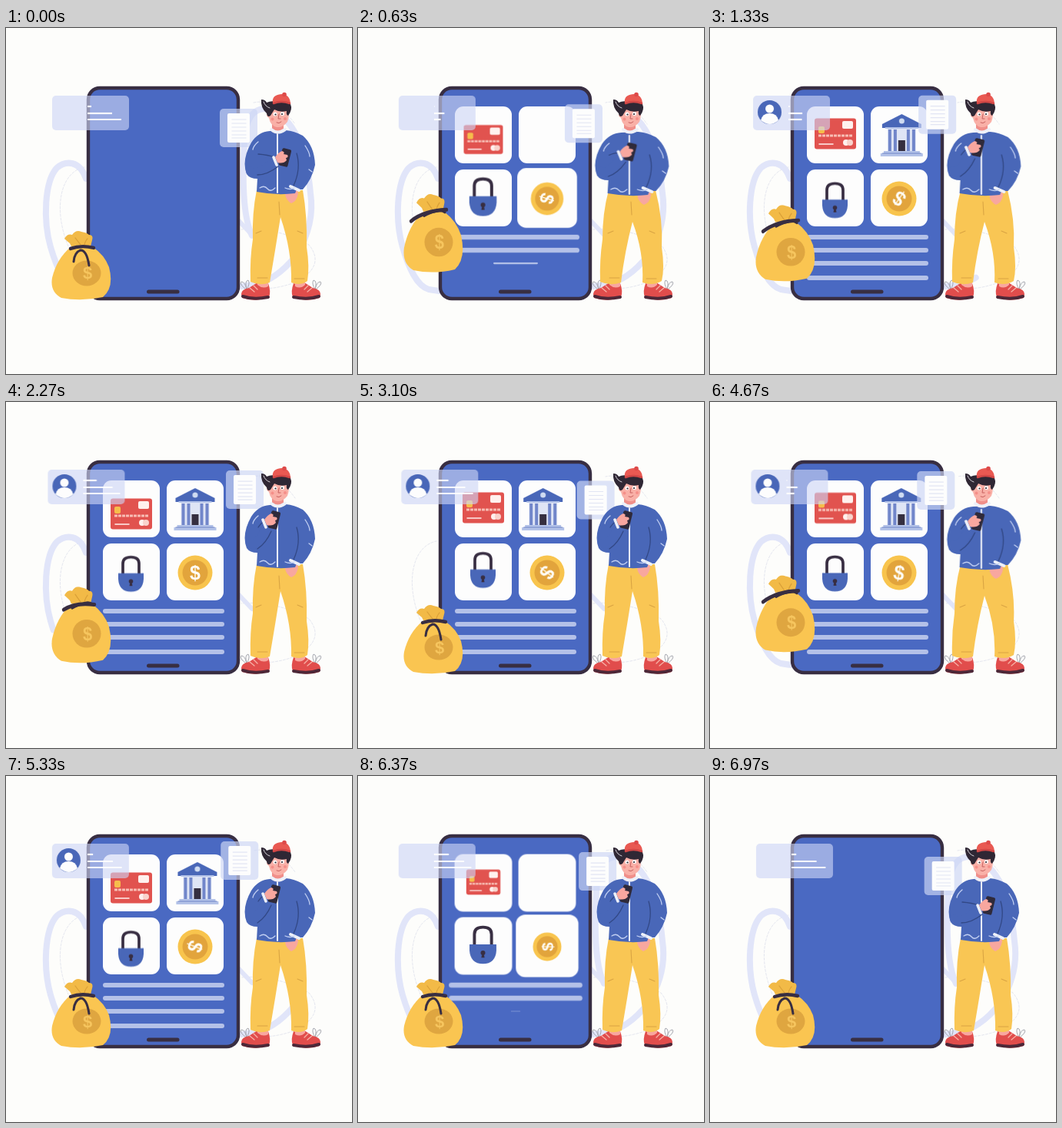
An HTML page without scripts for the animation above (7.01 s loop, 450 by 450 pixels).

```html
<!DOCTYPE html>
<html lang="en">
<head>
<meta charset="utf-8">
<title>Mobile banking</title>
<style>
:root {
  --loop: 7.01s; --half: 3.505s; --quarter: 1.7525s;
  --blue: #4967b8; --dark: #382e42; --yellow: #f9c654; --skin: #f8a79f; --paper: #fdfdfd;
}
html, body { margin: 0; width: 100%; height: 100%; overflow: hidden; background: #fdfdfb; }
svg { display: block; width: 100vw; height: 100vh; }
text { font-family: "Liberation Sans", Arial, sans-serif; font-weight: 700; text-anchor: middle; }
.line { fill: none; stroke-linecap: round; stroke-linejoin: round; }

/* staggered pops */
.pop { transform-box: fill-box; transform-origin: center; animation: tile var(--loop) linear infinite; }
.wide { animation-name: wide; }
.icon { animation-name: icon; }
.early { animation-name: early; }
.lock { animation-name: lock; }
.third { animation-name: third; }
@keyframes tile { 0%, 2% { transform: scale(0) } 5% { transform: scale(1.1) } 7%, 90.5% { transform: scale(1) } 94% { transform: scale(1.1) } 97.5%, 100% { transform: scale(0) } }
@keyframes wide { 0%, 4.5% { transform: scale(0) } 8% { transform: scale(1.1) } 10%, 88.5% { transform: scale(1) } 90.9% { transform: scale(1.1) } 94%, 100% { transform: scale(0) } }
@keyframes icon { 0%, 6% { transform: scale(0) } 9.5% { transform: scale(1.1) } 12%, 88% { transform: scale(1) } 90% { transform: scale(1.1) } 93.5%, 100% { transform: scale(0) } }
@keyframes early { 0%, 9% { transform: scale(0) } 12% { transform: scale(1.1) } 14%, 86.5% { transform: scale(1) } 88% { transform: scale(1.1) } 90.5%, 100% { transform: scale(0) } }
@keyframes lock { 0%, 5% { transform: scale(0) } 8.5% { transform: scale(1.1) } 10.5%, 90% { transform: scale(1) } 91.5% { transform: scale(1.1) } 94.5%, 100% { transform: scale(0) } }
@keyframes third { 0%, 8% { transform: scale(0) } 11% { transform: scale(1.1) } 13%, 86.5% { transform: scale(1) } 88% { transform: scale(1.1) } 91.1%, 100% { transform: scale(0) } }

/* floating parts */
.slide { animation: slide calc(var(--quarter) / 2) ease-in-out infinite alternate; }
@keyframes slide { to { transform: translateX(-8.5px) } }
.hover { animation: hover var(--quarter) ease-in-out infinite alternate; }
@keyframes hover { from { transform: translateY(-6.5px) } to { transform: translateY(.5px) } }
.lift { animation: lift var(--quarter) ease-in-out infinite; }
@keyframes lift { 0%, 30%, 100% { transform: none } 63% { transform: translateY(-7.5px) } 76% { transform: translateY(-8px) } }
.sway { animation: sway var(--quarter) calc(var(--half) * -.07) ease-in-out infinite alternate; }
@keyframes sway { from { transform: translateX(-4px) } to { transform: translateX(5px) } }
.turn { transform-origin: 246px 222px; animation: turn var(--loop) linear infinite; }
@keyframes turn { from { transform: rotate(10deg) } to { transform: rotate(1090deg) } }

/* text strokes on the profile card grow and shrink */
.row { stroke-dasharray: var(--mid) 200; animation: row var(--half) infinite; }
@keyframes row {
  0%, 50% { stroke-dasharray: var(--mid) 200; animation-timing-function: ease-out }
  25% { stroke-dasharray: var(--min) 200; animation-timing-function: ease-in }
  75% { stroke-dasharray: var(--max) 200; animation-timing-function: ease-in }
  100% { stroke-dasharray: var(--mid) 200 }
}

/* ribbon and dashes */
.trail { stroke-dasharray: 100 200; animation: trail var(--loop) linear infinite; }
@keyframes trail { 0%, 90.9%, 100% { stroke-dashoffset: 0 } 40%, 56.6% { stroke-dashoffset: 101 } }
.march { stroke-dasharray: 3 2; animation: march var(--half) linear infinite; }
@keyframes march { to { stroke-dashoffset: -50 } }

/* money bag */
.bag { transform-origin: 98px 353px; animation: bounce var(--half) linear infinite; }
@keyframes bounce {
  0%, 50%, 53%, 77%, 100% { transform: none }
  13.3% { transform: translateY(-33px) scaleY(1.14) }
  22% { transform: translateY(-38px) scaleY(1.14) }
  38% { transform: translateY(-24px) scaleY(1.11) }
  64.8% { transform: translateY(-14px) scaleY(1.11) }
}
.band { animation: band var(--half) linear infinite; }
@keyframes band {
  0%, 50%, 54%, 76%, 100% { d: path("M84 287Q98 282 114 286") }
  10%, 40% { d: path("M69 295Q86 283 115 282") }
  64.8% { d: path("M75 291Q90 282 115 285") }
}
.tail { animation: tail var(--half) linear infinite; }
@keyframes tail {
  0%, 50%, 54%, 76%, 100% { d: path("M88 304Q89 292 97 289Q105 289 108 309") }
  10%, 40%, 64.8% { d: path("M86 289Q94 285 100 284Q108 281 113 285") }
}

/* man */
.jacket { transform-origin: 356px 214px; animation: breathe var(--half) ease-in-out infinite; }
@keyframes breathe { 0%, 52%, 100% { transform: none } 13.3%, 38% { transform: translateY(2px) scaleX(1.05) } }
.pants { animation: pants var(--half) ease-in-out infinite; }
@keyframes pants {
  0%, 52%, 100% { d: path("M326 211H386Q392 245 391 285Q395 310 392 329Q383 336 371 331Q372 290 357 246Q350 290 343 331Q330 336 318 330Q317 300 321 275Q320 240 326 211Z") }
  13.3%, 38% { d: path("M326 211H387Q397 250 395 285Q399 312 395 329Q384 336 370 331Q372 292 357 252Q347 290 342 331Q328 336 315 330Q314 302 318 275Q318 240 326 211Z") }
}
.hand { animation: hand var(--loop) ease-in-out infinite; }
@keyframes hand { 0%, 5%, 98.5%, 100% { transform: none } 12%, 92% { transform: translate(-14px, -15px) } }
.arm { animation: arm var(--loop) ease-in-out infinite; }
@keyframes arm {
  0%, 5%, 98.5%, 100% { d: path("M318 186Q324 194 351 173") }
  12%, 92% { d: path("M318 184Q326 190 339 162") }
}
.crease { animation: crease var(--loop) ease-in-out infinite; }
@keyframes crease {
  0%, 5%, 98.5%, 100% { d: path("M328 164Q341 165 349 168M327 191Q340 191 354 180") }
  12%, 92% { d: path("M328 163Q332 157 335 156M327 191Q338 184 345 168") }
}
</style>
</head>
<body>
<svg viewBox="0 0 450 450" role="img" aria-label="Man with a banking app and a money bag">
  <defs>
    <rect id="tile" width="74" height="74" rx="11" fill="#fdfdfd"/>
    <g id="shoe">
      <path d="M306 346Q306 340 316 338L327 331Q334 335 341 332Q345 343 342 350Q324 357 307 351Z" fill="#e14d4c"/>
      <path class="line" d="M308 349Q322 354 341 350" stroke="#4d2838" stroke-width="4"/>
      <path class="line" d="M317 338L323 343M322 335L327 340" stroke="#f6b1a6" stroke-width="1.3"/>
    </g>
    <path id="sprig" class="line" d="M312 340Q303 333 306 330Q311 330 313 340Q310 329 315 328Q318 332 313 340" stroke="#a3a5ad" stroke-width="1"/>
  </defs>

  <!-- ribbons -->
  <path class="line march" stroke="#e4e6ef" stroke-width="1" d="M102 181C72 187 60 232 81 284M306 262Q350 258 394 282Q416 309 378 330Q340 345 304 335M322 97Q352 91 376 125"/>
  <g class="line" stroke="#e1e5f9">
    <path d="M302 250L320 269" stroke-width="6"/>
    <path class="trail" pathLength="100" stroke-width="8" d="M104 196C96 172 78 172 66 182C50 200 48 250 58 285C66 312 76 335 92 340C150 350 250 345 320 334Q350 330 378 295Q402 255 396 215Q388 125 345 106Q312 98 310 150Q305 240 320 270"/>
  </g>

  <!-- phone -->
  <rect x="107" y="78" width="195" height="274" rx="15" fill="#4a69c2" stroke="var(--dark)" stroke-width="4.4"/>
  <path class="line" d="M185.500 343H223" stroke="var(--dark)" stroke-width="5"/>

  <g class="pop"><use href="#tile" x="126" y="102"/></g>
  <g class="pop"><use href="#tile" x="209" y="102"/></g>
  <g class="pop"><use href="#tile" x="126" y="184"/></g>
  <g class="pop wide"><use href="#tile" x="209" y="184"/></g>

  <g class="line" stroke="#b4c1e8" stroke-width="6">
    <path class="pop wide" d="M129 272H281"/>
    <path class="pop wide" d="M129 289H281"/>
    <path class="pop third" d="M129 306H281"/>
    <path class="pop early" d="M129 325H281"/>
  </g>

  <g class="pop icon"><g class="lift">
    <rect x="136" y="125.500" width="54" height="40" rx="3" fill="#e1534f"/>
    <rect x="141" y="136" width="8" height="9" rx="2" fill="#f6bd4b"/>
    <rect x="172" y="129" width="14" height="10" rx="2" fill="#fff1ee"/>
    <path d="M141 148H186" stroke="#f8bdb4" stroke-width="3" stroke-dasharray="4 1"/>
    <path class="line" d="M142 159H160" stroke="#fff1ee" stroke-width="1.500"/>
    <circle cx="177" cy="157" r="4" fill="#fff1ee"/><circle cx="182" cy="157" r="4" fill="#f9d3cc"/>
  </g></g>

  <g class="pop early"><g class="sway">
    <path d="M226 131H263V160H226Z" fill="#dfe5f5"/>
    <path d="M229 132V160M236 132V160M253 132V160M260 132V160" stroke="#7186ca" stroke-width="4"/>
    <path d="M219 125L244.500 112L270 125V130H219Z" fill="var(--blue)"/>
    <circle cx="244.500" cy="121" r="3.500" fill="#cfdcf2"/>
    <path d="M223 130H266" stroke="#b3c2e8" stroke-width="2"/>
    <path d="M240 146H249V160H240Z" fill="#352f40"/>
    <path d="M221 160H268V163H272V167H217V163H221Z" fill="#b3c2e8"/>
    <path d="M219 163H270" stroke="#6e84c7" stroke-width="1"/>
  </g></g>

  <g class="pop lock"><g class="hover">
    <path class="line" d="M152 224V211Q152 202.500 162.500 202.500T173 211V224" stroke="var(--dark)" stroke-width="3.700"/>
    <path d="M146 223.500H179V231Q178 247.500 162.500 247.500T146 231Z" fill="var(--blue)"/>
    <circle cx="162.500" cy="234" r="2.800" fill="var(--dark)"/><path d="M161.500 235H163.500L164.500 240H160.500Z" fill="var(--dark)"/>
  </g></g>

  <g class="pop icon">
    <circle cx="246" cy="222" r="22.500" fill="#f8c44d"/>
    <circle cx="246" cy="222" r="16.500" fill="#e2a43c"/>
    <text class="turn" x="246" y="231" font-size="25" fill="#fffdf7">$</text>
  </g>

  <!-- profile card -->
  <g class="slide">
    <rect x="60" y="88" width="100" height="45" rx="5" fill="#cdd6f5" opacity=".62"/>
    <g class="pop early">
      <circle cx="81.500" cy="109.500" r="15.500" fill="var(--blue)"/>
      <circle cx="81.500" cy="105" r="5.500" fill="var(--paper)"/>
      <path d="M70 120Q72 111 81.500 111T93 120Q82 130 70 120Z" fill="var(--paper)"/>
    </g>
    <g fill="none" stroke="var(--paper)" stroke-width="2.200">
      <path class="row" style="--min:0; --mid:5; --max:21" d="M106 102H156"/>
      <path class="row" style="--min:11; --mid:32; --max:40" d="M106 111H156"/>
      <path class="row" style="--min:4; --mid:44; --max:49" d="M106 119H156"/>
    </g>
  </g>

  <!-- floating document -->
  <g transform="translate(302.500 120)"><g>
    <rect x="-24.500" y="-25" width="49" height="50" rx="5" fill="#cdd6f5" opacity=".68"/>
    <rect x="-14.500" y="-19" width="29" height="38" rx="2" fill="var(--paper)"/>
    <path d="M-9 -11H10M-9 -6H10M-9 -1H10M-9 4H10M-9 9H10M-9 13H10" stroke="#e2e5f4" stroke-width="1.200"/>
    <animateMotion dur="3.505s" repeatCount="indefinite" path="M0 10A10 10 0 0 1 0 -10A10 10 0 0 1 0 10"/>
  </g></g>

  <!-- money bag -->
  <g class="bag">
    <path d="M83 280Q76 274 76 274Q80 267 86 269Q91 262 98 265Q105 266 108 269Q114 269 112 276L110 284H85Z" fill="#f2ba47"/>
    <path class="line" d="M90 273Q96 281 98 283M106 274Q102 279 102 283" stroke="#d99f38" stroke-width="1.200"/>
    <path d="M84 285Q98 280 113 285Q128 295 134 311Q141 338 126 350Q98 356 72 351Q57 343 60 325Q66 300 84 285Z" fill="#fac551"/>
    <ellipse cx="105" cy="319" rx="18.500" ry="16.500" fill="#dfa640"/>
    <text x="106" y="326.500" font-size="22" font-weight="400" fill="#f6c55e">$</text>
    <g class="line" stroke="var(--dark)">
      <path class="band" d="M84 287Q98 282 114 286" stroke-width="4.400"/>
      <path class="tail" d="M88 304Q89 292 97 289Q105 289 108 309" stroke-width="3"/>
    </g>
  </g>

  <!-- man -->
  <use href="#sprig"/>
  <use href="#sprig" transform="matrix(-1 0 0 1 715 0)"/>
  <use href="#shoe"/>
  <use href="#shoe" transform="matrix(-1 0 0 1 715 0)"/>
  <path d="M327 325H341V336Q334 340 327 334ZM376 325H389V334Q383 340 376 336Z" fill="var(--skin)"/>
  <path class="pants" d="M326 211H386Q392 245 391 285Q395 310 392 329Q383 336 371 331Q372 290 357 246Q350 290 343 331Q330 336 318 330Q317 300 321 275Q320 240 326 211Z" fill="var(--yellow)"/>
  <path class="line" d="M325 267L332 264M379 264L386 267M355 226L356 243M327 325H340M375 326H388" stroke="#d9a443" stroke-width="1.100"/>
  <g class="jacket">
    <path d="M369 208Q379 207 380 215Q378 226 371 228Q364 224 363 216Z" fill="var(--skin)"/>
    <path d="M343 134Q328 135 319 149Q306 172 313 190Q317 196 327 196L326 213Q352 218 376 215L378 210L386 210Q398 197 402 178Q401 153 386 140Q375 134 364 133Z" fill="var(--blue)"/>
    <path class="line" d="M378 163Q384 183 374 205" stroke="#324885" stroke-width="1.300"/>
    <path class="line" d="M370 206L381 211" stroke="#eef1f9" stroke-width="4"/>
    <path class="line" d="M353 138V214" stroke="#eef1f9" stroke-width="2"/>
    <path class="line" d="M330 208Q336 204 340 209T350 208M363 208Q370 211 375 208M318 187L322 189M394 184L398 187M328 148Q322 153 321 158M389 153Q395 162 395 167" stroke="#c1cff2" stroke-width="1.300"/>
    <path class="line arm" d="M318 186Q324 194 351 173" stroke="var(--blue)" stroke-width="12"/>
    <path class="line crease" d="M328 164Q341 165 349 168M327 191Q340 191 354 180" stroke="#324885" stroke-width="1.300"/>
    <g class="hand">
      <path class="line" d="M348 168L352 178" stroke="#eef1f9" stroke-width="3.500"/>
      <rect x="357" y="157" width="12" height="23" rx="2" fill="#2f2a3a" transform="rotate(14 363 168)"/>
      <path d="M350 168Q354 162 359 160Q363 161 361 164L366 165Q368 168 364 169L365 172Q361 177 353 175Z" fill="var(--skin)"/>
    </g>
  </g>
  <path d="M346 123H361V134Q354 140 346 135Z" fill="#f08f8a"/>
  <path class="line" d="M345 132Q353 139 363 132" stroke="#eef1f9" stroke-width="4"/>
  <path d="M343 104H367Q369 115 366 122Q360 130 352 129Q344 127 342 117Q337 114 341 109Z" fill="#f9b0a7"/>
  <path d="M332 93Q337 93 339 97Q345 94 352 96Q366 96 370 99Q373 106 367 114Q364 113 365 108Q356 110 349 106L344 114Q340 117 339 111Q331 104 332 93Z" fill="#2f2734"/>
  <path class="line" d="M335 96Q337 102 343 104" stroke="#d9d6dc" stroke-width="1"/>
  <path d="M347 98Q345 87 358 86Q369 86 370 98Q358 95 347 98Z" fill="#e95952"/>
  <circle cx="362" cy="86.500" r="2.800" fill="#dd4a49"/>
  <path class="line" d="M348 98Q358 94 369 98" stroke="#d24746" stroke-width="2.500"/>
  <g fill="#fff"><circle cx="350" cy="112" r="2.500"/><circle cx="359.500" cy="111.500" r="2.500"/></g>
  <g fill="#2d2530"><circle cx="350.500" cy="112.500" r="1.100"/><circle cx="359" cy="112" r="1.100"/></g>
  <g fill="#f58f89"><circle cx="346.500" cy="118.500" r="2"/><circle cx="363" cy="118" r="2"/></g>
  <path class="line" d="M355 112L354 118L357 118M352 123Q355 125 358 122" stroke="#c8615f" stroke-width="1"/>
</svg>
</body>
</html>
```
